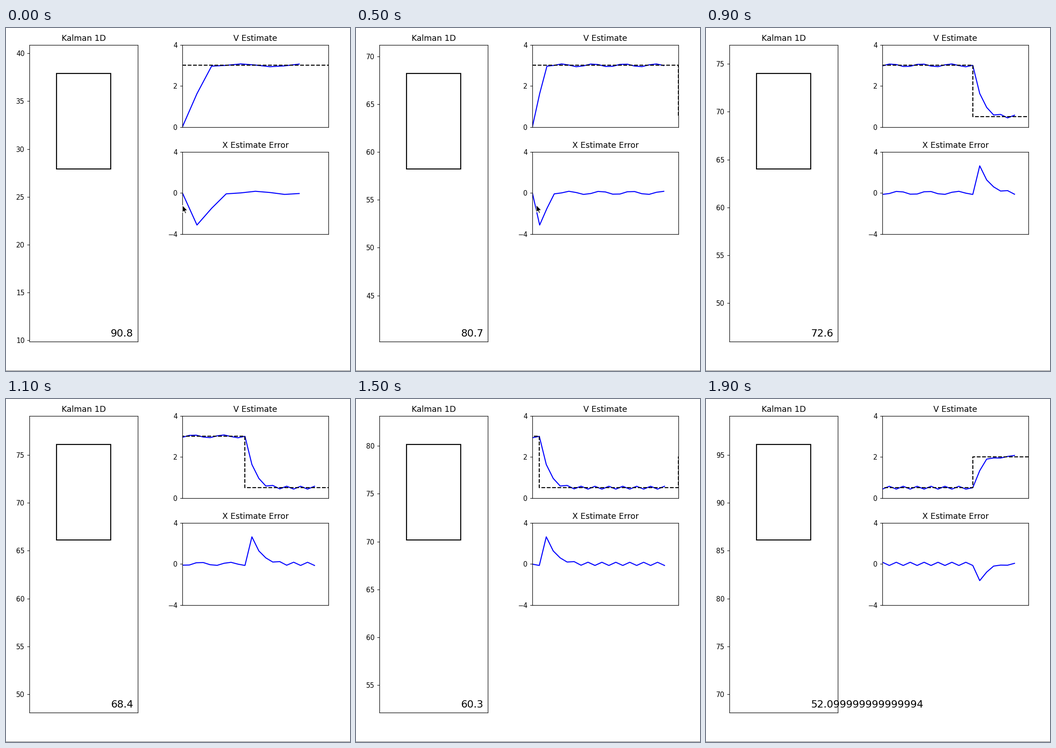
These frames come from a looping animation (749x747 px, 2 s). A matplotlib script:

```python
import numpy as np
import matplotlib.pyplot as plt
from matplotlib.animation import FuncAnimation
from matplotlib.patches import Polygon, Rectangle
from matplotlib.ticker import MultipleLocator
from matplotlib.transforms import IdentityTransform

W, H, DPI = 749, 747, 105.6
FRAMES, INTERVAL = 20, 100
STEP = 0.1          # simulated seconds per tick
WINDOW = 21         # seconds visible in the right-hand plots

# Simulation tick reached at a few moments of the loop
KEY_FRAMES = [0, 2, 5, 9, 11, 15, 19]
KEY_TICKS = [92, 133, 193, 274, 316, 397, 479]

# Start time, true speed, settling power, first noise dip, noise period
PHASES = [(0, 3, 3, 6.2, 4.25), (20, 0.5, 1.2, 1, 2), (40, 2, 1.7, 3.5, 5)]

ARROW = np.array([(0, 0), (0, 16), (3.7, 12.6), (6.2, 18.2), (8.6, 17.2),
                  (6.2, 11.7), (11.2, 11.4)])


def estimate(seconds):
    """Filter output: speed estimate and position error, once per second."""
    speed = np.zeros(seconds)
    lag = np.zeros(seconds)
    before = 0
    for start, true, power, dip, period in PHASES:
        m = np.arange(seconds - start)
        settle = (before - true) * np.exp(-0.78 * m ** power)
        noise = -0.07 * np.cos(2 * np.pi * (m - dip) / period)
        lag[start:] = settle + noise * np.minimum(m / 4, 1)
        speed[start:] = true + lag[start:]
        before = true
    # The position error follows the speed error one second later
    error = np.zeros(seconds)
    error[1:] = (lag + 0.13 * np.tanh(lag / 0.09))[:-1]
    return speed, error


def position(t):
    return (0.3 + 3 * min(t, 20) + 0.5 * np.clip(t - 20, 0, 20)
            + 2 * max(t - 40, 0))


fig = plt.figure(figsize=(W / DPI, H / DPI), dpi=DPI, facecolor="white")


def add_axes(left, top, right, bottom, title):
    ax = fig.add_axes([left / W, 1 - bottom / H,
                       (right - left) / W, (bottom - top) / H])
    ax.set_title(title)
    ax.set_xticks([])
    return ax


def add_plot(top, bottom, title, low, high, ticks):
    ax = add_axes(384, top, 702, bottom, title)
    ax.set_ylim(low, high)
    ax.set_yticks(ticks)
    line, = ax.plot([], [], "-b")
    return ax, line


track = add_axes(51, 36.55, 287, 682.55, "Kalman 1D")
track.set_xlim(0, 1)
track.yaxis.set_major_locator(MultipleLocator(5))
car = track.add_patch(Rectangle((0.25, 0), 0.5, 10, fill=False, lw=1.5))
clock = track.text(0.75, 0, "", fontsize=15)

v_ax, v_line = add_plot(36.55, 215.55, "V Estimate", 0, 4, [0, 2, 4])
v_ax.plot([0, 20, 20, 40, 40, 60], np.repeat([p[1] for p in PHASES], 2), "--k")
e_ax, e_line = add_plot(269.55, 448.55, "X Estimate Error", -4, 4, [-4, 0, 4])

# Window border along the bottom edge
fig.add_artist(Rectangle((0, 0), W, 1, fc="#707070", lw=0,
                         transform=IdentityTransform()))
cursor = fig.add_artist(Polygon(ARROW, fc="black", ec="white", lw=0.8,
                                transform=IdentityTransform(), zorder=10))

V_EST, X_ERR = estimate(max(KEY_TICKS) // 10)


def draw(i):
    tick = int(np.rint(np.interp(i, KEY_FRAMES, KEY_TICKS)))
    t = tick * STEP
    x = position(t)
    track.set_ylim(x - 18, x + 13)
    car.set_y(x)
    clock.set_y(x - 17.5)
    clock.set_text(str(100 - t))

    now = tick // 10
    for ax, line, data in ((v_ax, v_line, V_EST), (e_ax, e_line, X_ERR)):
        line.set_data(np.arange(now), data[:now])
        ax.set_xlim(max(0, now + 1 - WINDOW), now + 1)

    cursor.set_visible(i < 7)
    tip = (np.interp(i, [0, 2, 5], [384, 395.5, 392.5]),
           H - np.interp(i, [0, 2, 5], [386, 387.5, 385.5]))
    cursor.set_xy(tip + ARROW * (1, -1))
    return car, clock, v_line, e_line, cursor


anim = FuncAnimation(fig, draw, frames=FRAMES, interval=INTERVAL,
                     init_func=lambda: draw(0), repeat=True, repeat_delay=0,
                     blit=False)
plt.show()
```
